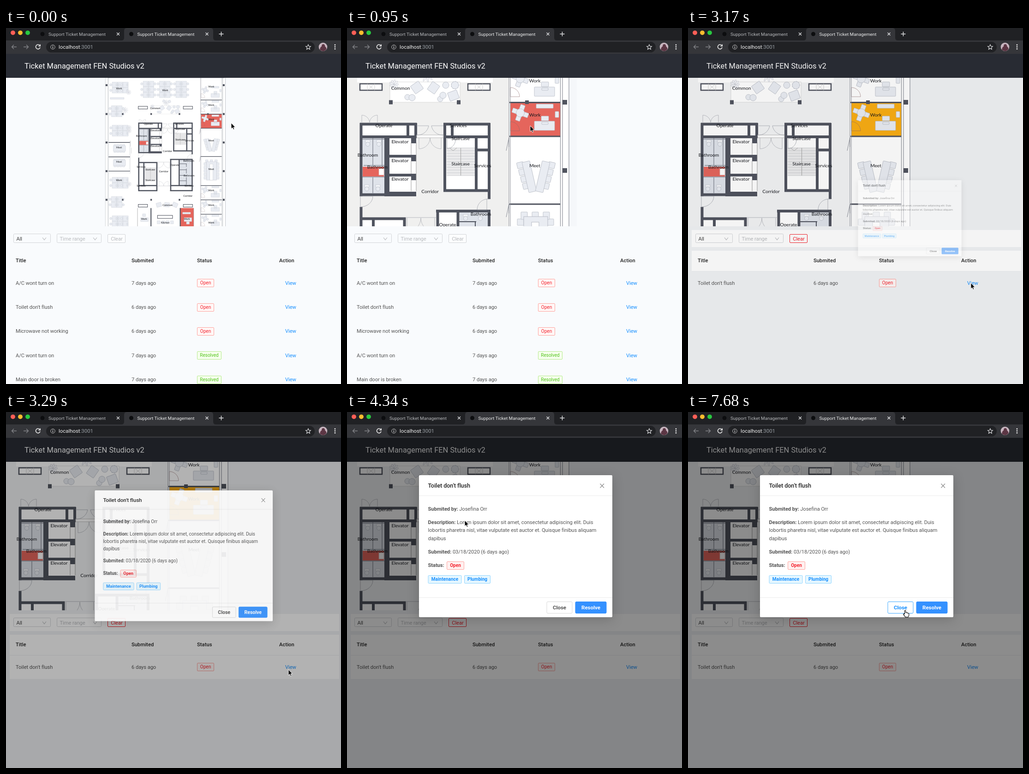
Animation, 726 px wide and 772 px high, one loop 8000 ms. Source, as an HTML page:

```html
<!DOCTYPE html>
<html lang="en">
<head>
<meta charset="utf-8">
<title>Support Ticket Management</title>
<style>
html, body { margin: 0; width: 100%; height: 100%; overflow: hidden; background: #f9fbfd; }
svg { display: block; }
text { font-family: Roboto, Inter, sans-serif; white-space: pre; }
#labels text { font-family: Lato, "Open Sans", sans-serif; text-anchor: middle; fill: #15171c; }
#panel { filter: drop-shadow(0 5px 12px rgba(0,0,0,.18)); }
</style>
</head>
<body>
<svg id="stage" width="726" height="772" viewBox="0 0 726 772"></svg>
<script>
const WALL = '#50545f', ITEM = '#e9ecf2', EDGE = '#b7bbc5', RED = '#e5655c', BLUE = '#1890ff';

// ---------- drawing helpers ----------
const rect = (x, y, w, h, fill, stroke = 'none', more = '') =>
  `<rect x="${x}" y="${y}" width="${w}" height="${h}" fill="${fill}" stroke="${stroke}" ${more}/>`;
const line = (d, stroke, width = 1, more = '') =>
  `<path d="${d}" fill="none" stroke="${stroke}" stroke-width="${width}" ${more}/>`;
const circle = (x, y, r, fill = ITEM, stroke = 'none') =>
  `<circle cx="${x}" cy="${y}" r="${r}" fill="${fill}" stroke="${stroke}" stroke-width=".8"/>`;
const text = (x, y, str, { size = 11.2, fill = '#555', weight = 400, anchor = 'start', gap = -.08, more = '' } = {}) =>
  `<text x="${x}" y="${y + size * .355}" font-size="${size}" fill="${fill}" font-weight="${weight}" ` +
  `text-anchor="${anchor}" letter-spacing="${gap}" ${more}>${str}</text>`;
const tag = (x, y, w, str, ink, border, fill, weight = 400) =>
  rect(x + .5, Math.floor(y - 8) + .5, w - 1, 17, fill, border, 'rx="1.5"') +
  text(x + w / 2, y, str, { size: 10, fill: ink, weight, anchor: 'middle', gap: 0 });
const repeat = (n, f) => Array.from({ length: n }, (_, i) => f(i)).join('');

// ---------- floor plan (units: pixels at full zoom) ----------
const item = (x, y, w, h, turn = 0) =>
  rect(x, y, w, h, ITEM, EDGE, `stroke-width=".8" rx="1" transform="rotate(${turn} ${x + w / 2} ${y + h / 2})"`);
const round = (x, y, r) => circle(x, y, r, ITEM, EDGE);
const plant = (x, y, r = 12) =>
  repeat(9, i => `<ellipse cx="${x + r * .6}" cy="${y}" rx="${r * .5}" ry="1.8" fill="#f7f8fb" stroke="${EDGE}" ` +
    `stroke-width=".6" transform="rotate(${i * 40} ${x} ${y})"/>`);
const desks = (x, y, cols, rows) =>
  repeat(cols * rows, i => {
    const c = i % cols, r = Math.floor(i / cols), dx = x + c * 28, dy = y + r * 29;
    return round(dx + (c % 2 ? 34 : -7), dy + 14, 6) + item(dx, dy, 28, 28) + item(dx + (c % 2 ? 3 : 20), dy + 8, 5, 12);
  });
const doubleDoor = (x, y, r, dir) => {
  const s = dir > 0 ? 0 : 1;
  return line(`M${x - r} ${y}v${dir * r}a${r} ${r} 0 0 ${s} ${r} ${-dir * r}` +
    `M${x + r} ${y}v${dir * r}a${r} ${r} 0 0 ${1 - s} ${-r} ${-dir * r}`, '#b5b7bd', .9);
};
const workRoom = v =>
  repeat(4, i => {
    const a = i * 90 + 20, r = a * Math.PI / 180;
    return item(370 + 12.5 * Math.cos(r), v + 17 + 12.5 * Math.sin(r), 11, 10, a);
  }) +
  round(375.5, v + 22, 9) + item(410, v + 3, 37, 9) + item(451, v + 19, 8, 13) +
  item(421, v + 29, 16, 10) + item(406, v + 40, 44, 20) + item(422, v + 42, 14, 5) +
  line(`M354 ${v + 41}a20 20 0 0 1 20 20H354Z`, '#8b6a6a', .6);
const slantedTable = (side) =>
  `<g transform="translate(409.5 0) scale(${side} 1)">` +
  repeat(4, i => item(-41 + i * 4.2, 291 + i * 15, 14, 13, -13)) +
  item(-23, 289, 17, 67, -13) + '</g>';
const leftMeeting = v => repeat(4, i => item(-99 + i * 15, v - 21, 12, 42)) + item(-102, v - 14, 64, 28);
const stairs = (x, y, w, n) =>
  rect(x, y, w, n * 6, '#ebebec') + repeat(n + 1, i => line(`M${x} ${y + i * 6}h${w}`, '#c2c4c8', .8)) +
  line(`M${x + w / 2} ${y}v${n * 6}`, '#aaa', 1.2);
const planter = (x, y) => rect(x, y, 48, 14, '#fff', WALL, 'stroke-width="2.5"') +
  line(`M${x + 16} ${y}l16 14M${x + 32} ${y}l-16 14M${x + 16} ${y}v14M${x + 32} ${y}v14`, '#bbb', .7);
const wc = (x, y) => rect(x + 2, y, 10, 5, '#f3f5f8', EDGE, 'stroke-width=".6"') + round(x + 7, y + 9, 4.5);
const columns = [-40, 11, 161, 309, 458, 607].map(v =>
  rect(467, v - 5, 10, 10, WALL) + rect(-142, v - 5, 10, 10, WALL)).join('');

const plan =
  rect(-144, -40, 625, 830, '#fff') +
  rect(-15, -40, 367, 830, '#f0f0ef', 'none', 'id="floor"') +
  rect(22, -40, 294, 158, '#fff') + rect(93, 117, 152, 44, '#fff', '#ccc', 'stroke-width=".7"') +
  rect(22, 645, 294, 140, '#fff') + rect(94, 610, 151, 60, '#fff') +
  // top and lounge furniture
  [53, 138, 223].map(u => desks(u, -10, 2, 3)).join('') + plant(173, 102, 14) + item(155, 88, 12, 12, 20) + item(184, 90, 12, 12, -20) +
  item(141, 119, 21, 20, -35) + item(178, 119, 19, 21, 35) + item(220, 137, 21, 19, -20) +
  round(214, 124, 7) + plant(234, 124, 8) + round(234, 124, 8) + round(131, 150, 6) + round(141, 151, 7) +
  round(202, 154, 6) + round(208, 146, 7) + plant(102, 122, 9) +
  planter(28, 121) + planter(262, 121) + planter(28, 631) + planter(262, 631) +
  // left wing
  desks(-108, -5, 3, 2) + plant(-22, 48) + plant(-41, 141, 15) + item(-118, 75, 72, 9) + desks(-112, 118, 2, 2) +
  desks(-108, 219, 3, 2) + plant(-20, 248) + plant(-20, 232) + leftMeeting(340) + leftMeeting(415) +
  desks(-108, 490, 3, 2) + plant(-20, 525) + desks(-112, 590, 2, 2) + desks(-108, 690, 3, 2) +
  line('M-127 309H-15M-127 384H-15M-127 458H-15', WALL, 3.5) +
  line('M-143-40V790M-130-40V790M-127-40V790M-15 300V470M-12 300V330M-8 336V366', '#9a9da5', 1) +
  [-53, 95, 242].map(u => [161, 607].map(v => rect(u - 4, v - 4.5, 8, 9, WALL)).join('')).join('') +
  // right wing
  rect(354, 162, 108, 73, RED, 'none', 'id="room"') +
  [14, 88, 162, 533, 607, 682].map(workRoom).join('') + slantedTable(1) + slantedTable(-1) +
  repeat(5, i => item(369, 414 + i * 18, 14, 14) + item(434, 414 + i * 18, 14, 14)) +
  repeat(3, i => item(377 + i * 24, 399, 14, 16)) + rect(383, 409, 52, 96, ITEM, EDGE) + rect(400, 421, 16, 84, '#fff', EDGE) +
  line('M352 88H462M352 161.5H462M352 235H462M352 382H462M352 533H462M352 607H462M352 682H462', WALL, 3) +
  line('M351-40V790M354-40V790M345 266l6-28v20M345 410l6-28v20', '#8d9099', 1) +
  line('M462.5-40V790M467-40V790M481-40V790', '#8d9099', 1.2) + rect(386, 157, 8, 8, WALL) + columns +
  line('M-130-28H475', WALL, 3) +
  // lower rooms
  rect(245, 650, 71, 140, RED) + item(258, 672, 42, 9) + item(266, 700, 40, 20) + item(278, 720, 16, 14) +
  item(40, 700, 40, 20) + item(50, 680, 16, 14) + rect(128, 688, 78, 16, '#fff', WALL, 'stroke-width="2.5"') +
  repeat(4, i => item(126 + i * 23, 716, 16, 16)) + repeat(3, i => item(122 + i * 42, 622, 26, 22, 20 * i - 15)) +
  line('M94 650V790M246 650V790', WALL, 5) + line('M24 650V790M316 650V790', '#888', 1.5) +
  // core rooms
  rect(28, 206, 123, 156, '#fff') + rect(209, 206, 101, 148, '#fff') +
  rect(28, 412, 99, 150, '#fff') + rect(193, 394, 119, 168, '#fff') +
  rect(33, 239, 48, 120, '#dfe3ea') + rect(34, 301, 46, 21, RED) + rect(69, 305, 11, 14, '#fff', '#d9a9a6') +
  wc(38, 243) + wc(62, 243) + wc(36, 340) + wc(60, 340) +
  line('M33 241H81M56 239V298M36 298H81M33 323H81M56 324V358M76 239V300', '#8d919b', 1.5) +
  stairs(216, 260, 61, 10) + stairs(61, 440, 61, 11) + line('M222 260l8 6 8-6', '#aaa', 1) +
  rect(244, 399, 61, 132, '#dfe3ea') + wc(250, 404) + wc(282, 404) + wc(250, 456) + wc(250, 486) + wc(285, 512) +
  line('M243 420H280M243 451H278M243 480H278M243 508H278M278 420V436M278 445V470M278 490V530', WALL, 2) +
  line('M30.500 206V365M28 208.500H151M28 236H151M132 206V236M149 206V236M28 361.500H150M92 278H150M92 319H150', WALL, 6) +
  line('M86.500 236V362', WALL, 11) + line('M81 360H150', WALL, 10) +
  [236, 275, 316].map(v => rect(139, v, 11, 14, WALL)).join('') + line('M139 248V275M139 288V316M139 329V354M150 248V354', '#999', 1) +
  line('M209 208.500H310M209 236H310M228 206V236M212 206V355M308 206V371M280 236V352M209 352.500H311M282 264.500H306', WALL, 6) +
  line('M30.500 388V562M28 413.500H127M57 414V535M124.500 411V562M28 533H127M28 559.500H127', WALL, 6) +
  line('M308 394V562M193 397H311M196.500 394V562M240.500 396V535M193 533H311M193 559.500H311', WALL, 6) +
  rect(151, 232, 58, 6, '#fff', '#aaa', 'stroke-width=".8"') + line('M127 411H193M127 535H193', '#b5b7bd', 1.2) +
  doubleDoor(180, 238, 24, 1) + doubleDoor(49, 206, 17, -1) + doubleDoor(160, 412, 30, 1) + doubleDoor(160, 535, 24, -1) +
  line('M151 212h26a24 24 0 0 1-26 20M209 212h-26a24 24 0 0 0 26 20M29 365H56a27 23 0 0 1-27 23Z' +
    'M309 371H303V394H282a23 23 0 0 1 21-23M217 262V240h18a20 20 0 0 1-18 22', '#aaadb4', .9);

const labels = Object.entries({
  Work: '168,37 -72,28 407,18 407,115 407,189 407,559 407,634 407,725 -72,506 58,706 281,706',
  Meet: '407,299 407,449 -72,336 -72,410', Common: '116,131 180,634', Operate: '80,212 218,427',
  Services: '241,212 294,299 43,437 43,535 292,535', Staircase: '246,240 246,295 90,451 90,506',
  Elevator: '115,247 115,288 115,328', Bathroom: '45,276 66,302 290,404 292,482',
  Corridor: '180,355 160,459 286,588', Kitchen: '168,727'
}).flatMap(([name, spots]) => spots.split(' ').map(p => [name, ...p.split(',').map(Number)]));

// ---------- page ----------
const select = (x, w, str, ink) => rect(x + .5, 446.5, w, 19, 'none', '#d3d5d8', 'rx="2"') +
  text(x + 6.5, 457, str, { fill: ink }) + line(`M${x + w - 17} 454.5l4 5 4-5`, '#b8babd', 1.1);
const row = (i, title, age, open) => {
  const y = 552.7 + i * 52.4;
  return text(21, y, title) + text(272, y, age) + text(605, y, 'View', { fill: BLUE }) +
    (open ? tag(414, y, 37, 'Open', '#f5222d', '#ffa39e', '#fff7f6') : tag(414, y, 53, 'Resolved', '#52c41a', '#b7eb8f', '#f6ffed'));
};
const page =
  rect(0, 56, 726, 716, '#f9fbfd', 'none', 'id="page"') +
  `<g clip-path="url(#view)">${rect(0, 108, 498, 322, '#f5f7fa', 'none', 'id="mapBack"')}<g id="plan">${plan}</g>` +
  `<g id="labels">${labels.map(l => `<text>${l[0]}</text>`).join('')}</g></g>` +
  `<g id="cards">${rect(8, 438, 714, 37, '#fff')}${rect(8, 483, 714, 96, '#fff')}${rect(8, 527, 714, 52, '#f0f2f5', 'none', 'id="hover"')}` +
  `${line('M8 527.5H722', '#eceef0')}</g>` +
  select(16, 80, 'All', '#444') + select(110, 96, 'Time range', '#b9bbbe') +
  `<g id="clear">${rect(220.5, 447.5, 38, 18, '#fff', '#d3d5d8', 'rx="1.5" fill-opacity=".5"')}` +
  `${text(240, 457, 'Clear', { fill: '#b9bbbe', anchor: 'middle' })}</g>` +
  [[21, 'Title'], [272, 'Submited'], [414, 'Status'], [592, 'Action']]
    .map(([x, s]) => text(x, 504.5, s, { fill: '#222', weight: 500, gap: .05 })).join('') +
  `<g id="every">${row(0, 'A/C wont turn on', '7 days ago', 1)}${row(1, "Toilet don't flush", '6 days ago', 1)}` +
  `${row(2, 'Microwave not working', '6 days ago', 1)}${row(3, 'A/C wont turn on', '7 days ago')}` +
  `${row(4, 'Main door is broken', '7 days ago')}</g>` +
  `<g id="single">${row(0, "Toilet don't flush", '6 days ago', 1)}</g>` +
  rect(0, 56, 726, 52, '#2a2d35') + text(40, 82, 'Ticket Management FEN Studios v2', { size: 16.4, fill: '#fff', gap: 0 }) +
  rect(0, 56, 726, 716, '#000', 'none', 'id="mask"');

// ---------- dialog ----------
const para = (y, head, body) => text(175.5, y, `<tspan font-weight="600">${head}</tspan>${body}`);
const button = (x, w, str, ink, fill, border) => rect(x + .5, 411.5, w - 1, 25, fill, border, 'rx="2"') +
  text(x + w / 2, 424, str, { size: 11.6, fill: ink, weight: 600, anchor: 'middle' });
const dialog = `<g id="dialog">` +
  rect(156, 137, 419, 308, '#fff', 'none', 'rx="2" id="panel"') +
  text(175.5, 159.5, "Toilet don't flush", { size: 12.7, fill: '#222', weight: 500, gap: -.1 }) +
  line('M548.5 155.5l8.5 9M557 155.5l-8.5 9', '#888', 1.1) + line('M156 181.5H575M156 402.5H575', '#ececec') +
  para(210, 'Submited by: ', 'Josefina Orr') +
  para(239, 'Description: ', 'Lorem ipsum dolor sit amet, consectetur adipiscing elit. Duis') +
  para(256.5, '', 'lobortis pharetra nisl, vitae vulputate est auctor et. Quisque finibus aliquam') +
  para(274, '', 'dapibus') + para(303, 'Submited: ', '03/18/2020 (6 days ago)') + para(332, 'Status:', '') +
  tag(216, 332.5, 38, 'Open', '#f5222d', '#ffa39e', '#fff1f0', 600) +
  tag(175.5, 362.5, 73, 'Maintenance', BLUE, '#91d5ff', '#e6f7ff', 600) + tag(254, 362.5, 57, 'Plumbing', BLUE, '#91d5ff', '#e6f7ff', 600) +
  `<g id="close">${button(432.5, 56, 'Close', '#555', '#fff', '#d9d9d9')}</g>` +
  button(494.5, 68, 'Resolve', '#fff', '#3491ff', '#3491ff') + '</g>';

// ---------- browser frame ----------
const tab = (x, ink) => circle(x + 15, 13, 4.5, '#0c0d0f') + text(x + 28, 13.3, 'Support Ticket Management', { size: 9.84, fill: ink, gap: 0 }) +
  line(`M${x + 176} 10l6 6m0-6l-6 6`, '#e4e5e7', 1.2);
const chrome =
  rect(0, 0, 726, 56, '#35363a') + rect(0, 0, 726, 27, '#202124') +
  '<path d="M250 27q6 0 6-6V6q0-6 6-6H443q6 0 6 6V21q0 6 6 6Z" fill="#35363a"/>' +
  circle(15, 10.3, 4.9, '#fe5f57') + circle(31, 10.3, 4.9, '#febc2e') + circle(47, 10.3, 4.9, '#28c840') +
  tab(64, '#b5b7ba') + tab(256.5, '#eceded') + line('M461.5 13h10M466.5 8v10', '#e4e5e7', 1.4) +
  rect(87, 30, 582, 23, '#202124', 'none', 'rx="11.5"') +
  line('M23 41H12.5M17 36.5L12.5 41 17 45.5M38 41H48.5M44 36.5L48.5 41 44 45.5', '#818286', 1.4) +
  line('M73 37.7A4.8 4.8 0 1 0 74 42M74.2 35.5V39.3H70.3', '#eee', 1.6) +
  circle(101.5, 41.3, 4.7, 'none', '#eee') + line('M101.5 40.5V44M101.5 38.2V39.4', '#eee', 1.2) +
  text(114, 41.3, 'localhost<tspan fill="#9aa0a6">:3001</tspan>', { size: 11.4, fill: '#f1f1f1', gap: 0 }) +
  line('M655 36l1.5 3.6 3.9.3-3 2.5 1 3.9-3.4-2.1-3.4 2.1 1-3.9-3-2.5 3.9-.3Z', '#e4e5e7', 1.1) +
  circle(687, 41, 9.3, '#c6b4be') + '<path d="M680 47q1-6 4-7 0-5 3.500-5t4 5q3 2 3 6-7 8-14.500 1Z" fill="#5c3644"/>' +
  [36.7, 41, 45.3].map(y => circle(713, y, 1.4, '#eee')).join('');

const cursors =
  '<path id="arrow" d="M0 0V12.500L2.900 9.900 4.900 14.300 6.900 13.400 5 9.200H8.800Z" fill="#000" stroke="#fff" stroke-width=".9"/>' +
  '<path id="hand" d="M-1.500 8V1.200Q-1.500 0 -.300 0T1 1.200V5Q2.600 4.200 3.500 5.500 5 5 5.700 6.300 7.800 6 7.800 8V10.500Q7.500 13 6 14.800H0Q-1 12.500-4 9.500-4.500 7.800-3 7.600Z" ' +
  'fill="#fff" stroke="#000" stroke-width="1.1"/>';

document.getElementById('stage').innerHTML =
  '<defs><clipPath id="view"><rect x="0" y="108" width="498" height="322"/></clipPath></defs>' +
  page + dialog + chrome + cursors;

// ---------- motion ----------
const zoom = [[60, .417, 275, 119.4], [471, .856, 57.6, 27.2], [940, 1, 0, 0]];
const popup = [[3063, .25, 0, 0], [3181, .536, .5, .045], [3298, .92, .9, .3], [3416, .998, 1, .45], [3530, 1, 1, .45]];
const pointer = [
  [240, 488, 206], [471, 374, 191], [825, 397, 212], [1650, 397, 212], [1767, 378, 290], [1885, 328, 420], [2003, 303, 530],
  [2120, 360, 612], [2238, 460, 634], [2356, 545, 602], [2474, 590, 566], [2827, 613, 553], [3181, 613, 553], [3416, 611, 564],
  [3534, 560, 546], [3652, 470, 512], [3769, 404, 480], [3887, 350, 415], [4123, 288, 300], [4359, 255, 235], [4476, 246, 207],
  [4594, 261, 205], [5537, 261, 205], [5654, 267, 229], [5890, 283, 248], [6361, 284, 249], [6479, 250, 198], [6597, 227, 158],
  [6715, 227, 158], [7068, 320, 270], [7421, 440, 405], [7539, 471, 430]
];
function at(keys, t) {
  const n = keys.findIndex(k => k[0] > t);
  if (n === 0) return keys[0].slice(1);
  if (n < 0) return keys[keys.length - 1].slice(1);
  const a = keys[n - 1], b = keys[n], p = (t - a[0]) / (b[0] - a[0]);
  return a.slice(1).map((v, i) => v + (b[i + 1] - v) * p);
}
const $ = id => document.getElementById(id);
const set = (el, attrs) => { for (const k in attrs) el.setAttribute(k, attrs[k]); };
const show = (id, on) => set($(id), { visibility: on ? 'visible' : 'hidden' });
const paint = (id, border, ink) => {
  set($(id).querySelector('rect'), { stroke: border });
  set($(id).querySelector('text'), { fill: ink });
};
const labelNodes = [...$('labels').children];

function draw() {
  const t = Math.floor((performance.now() % 8000 + 30) / 117.8) * 117.8;
  const filtered = t > 1100, masked = t > 3050;

  const [s, tx, ty] = at(zoom, t), size = Math.min(10.2, 13 * s);
  set($('plan'), { transform: `translate(${tx} ${ty}) scale(${s})` });
  set($('floor'), { opacity: Math.min(1, (s - .417) * 4), fill: masked ? '#f2f3f5' : '#f0f0ef' });
  labelNodes.forEach((el, i) => {
    const [name, u, v] = labels[i], tight = name === 'Bathroom' && u === 66;
    set(el, { x: u * s + tx, y: v * s + ty + size * .33, 'font-size': size, opacity: tight && s < .93 ? 0 : 1 });
  });

  set($('room'), { fill: filtered ? '#faad14' : RED });
  show('every', !filtered);
  show('single', filtered);
  paint('clear', filtered ? '#f5222d' : '#d3d5d8', filtered ? '#f5222d' : '#b9bbbe');
  set($('page'), { fill: masked ? '#f0f2f5' : '#f9fbfd' });
  set($('mapBack'), { fill: masked ? '#f0f2f5' : s < .6 ? '#f9fbfd' : '#f5f7fa' });
  show('cards', masked);
  show('hover', masked && t < 3290);

  const [grow, alpha, shade] = at(popup, t);
  set($('mask'), { opacity: shade });
  set($('dialog'), { opacity: alpha, transform: `translate(613 552) scale(${grow}) translate(-613 -552)` });
  const hot = t > 7600;
  paint('close', hot ? '#40a9ff' : '#d9d9d9', hot ? BLUE : '#555');

  const [x, y] = at(pointer, t), overClose = t > 7500;
  for (const id of ['arrow', 'hand']) set($(id), { transform: `translate(${x} ${y})` });
  show('arrow', !overClose);
  show('hand', overClose);
  requestAnimationFrame(draw);
}
draw();
</script>
</body>
</html>
```
